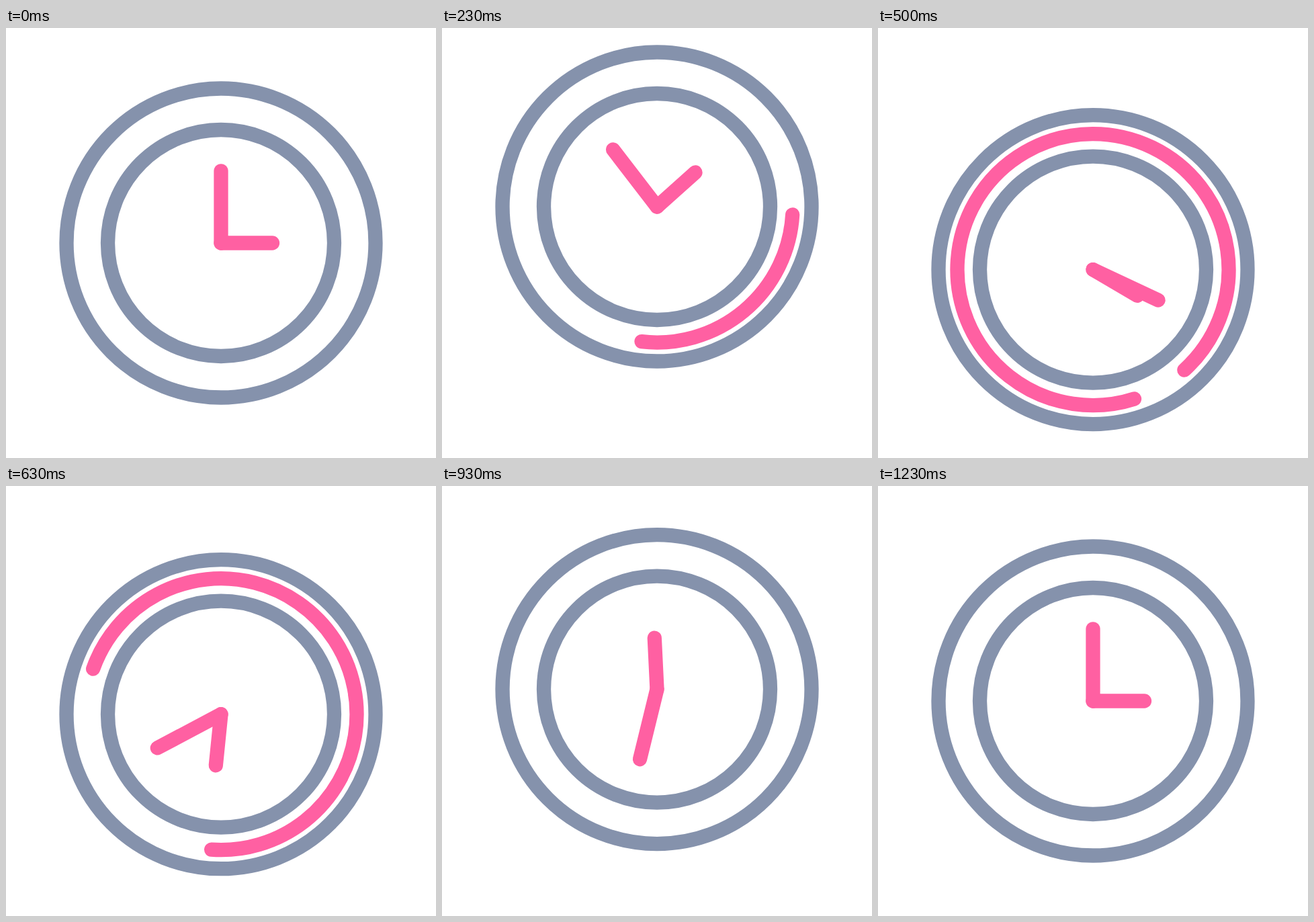
Recreate the animation shown at these times as an HTML page. Size 640 by 640 pixels, loop 1.67 s.

```html
<!DOCTYPE html>
<html lang="en">
<head>
<meta charset="utf-8">
<title>Clock</title>
<style>
  html, body { margin: 0; width: 100%; height: 100%; overflow: hidden; background: #fff; }
  svg { display: block; width: 100%; height: 100%; }
  g { fill: none; stroke: #8592ac; stroke-width: 21.3; stroke-linecap: round; }
  .pink { stroke: #ff60a2; }
</style>
</head>
<body>
<svg viewBox="0 0 640 640">
  <g id="clock">
    <circle r="230"/>
    <circle r="168.5"/>
    <path id="arc" class="pink"/>
    <path id="minute" class="pink" d="M0 0V-107.2"/>
    <path id="hour" class="pink" d="M0 0V-76.5"/>
  </g>
</svg>
<script>
const LOOP = 1670, STEP = 100 / 3, ARC_RADIUS = 202;
const [clock, arc, minute, hour] =
  ['clock', 'arc', 'minute', 'hour'].map(id => document.getElementById(id));

const progress = (step, from, to) => Math.min(1, Math.max(0, (step - from) / (to - from)));

// cubic-bezier(x1, 0, x2, 1), solved by bisection.
const bezier = (x1 = 1 / 3, x2 = 2 / 3) => x => {
  let low = 0, high = 1;
  for (let i = 0; i < 24; i++) {
    const s = (low + high) / 2, r = 1 - s;
    if (3 * s * r * r * x1 + 3 * s * s * r * x2 + s ** 3 < x) low = s;
    else high = s;
  }
  return low * low * (3 - 2 * low);
};
const smooth = bezier();
const sineIn = p => 1 - Math.cos(p * Math.PI / 2);
const sineOut = p => Math.sin(p * Math.PI / 2);

// Sum of eased moves: each is [from step, to step, distance, easing].
const move = (start, ...moves) => step => moves.reduce(
  (value, [from, to, distance, ease = smooth]) =>
    value + distance * ease(progress(step, from, to)), start);

const height = move(320,
  [0, 5, -56], [5, 16, 98, bezier(.79, .63)], [16, 24, -70.5], [24, 34, 28.5, bezier(.27, .67)]);
const minuteAngle = move(0, [0, 5, -45], [5, 37, 765, bezier(.36, .7)]);
const hourAngle = move(90, [0, 5, -45], [5, 37, 405, bezier(.405, .7)]);

// The arc turns by a third while its head, then its tail, run once around.
const arcHead = move(90, [5, 25, 120], [5, 17, 360, sineOut]);
const arcTail = move(90, [5, 25, 120], [13, 25, 360, sineIn]);

function arcPath(from, to) {
  if (to - from < 1) return '';
  const point = degrees => {
    const a = degrees * Math.PI / 180;
    return `${ARC_RADIUS * Math.sin(a)} ${-ARC_RADIUS * Math.cos(a)}`;
  };
  const large = to - from > 180 ? 1 : 0;
  return `M${point(from)}A${ARC_RADIUS} ${ARC_RADIUS} 0 ${large} 1 ${point(to)}`;
}

function draw(time) {
  const step = Math.floor((time % LOOP + 3.4) / STEP);
  clock.setAttribute('transform', `translate(320 ${height(step)})`);
  minute.setAttribute('transform', `rotate(${minuteAngle(step)})`);
  hour.setAttribute('transform', `rotate(${hourAngle(step)})`);
  arc.setAttribute('d', arcPath(arcTail(step), arcHead(step)));
}

let start;
function tick(now) {
  start ??= now;
  draw(now - start);
  requestAnimationFrame(tick);
}
draw(0);
requestAnimationFrame(tick);
</script>
</body>
</html>
```
